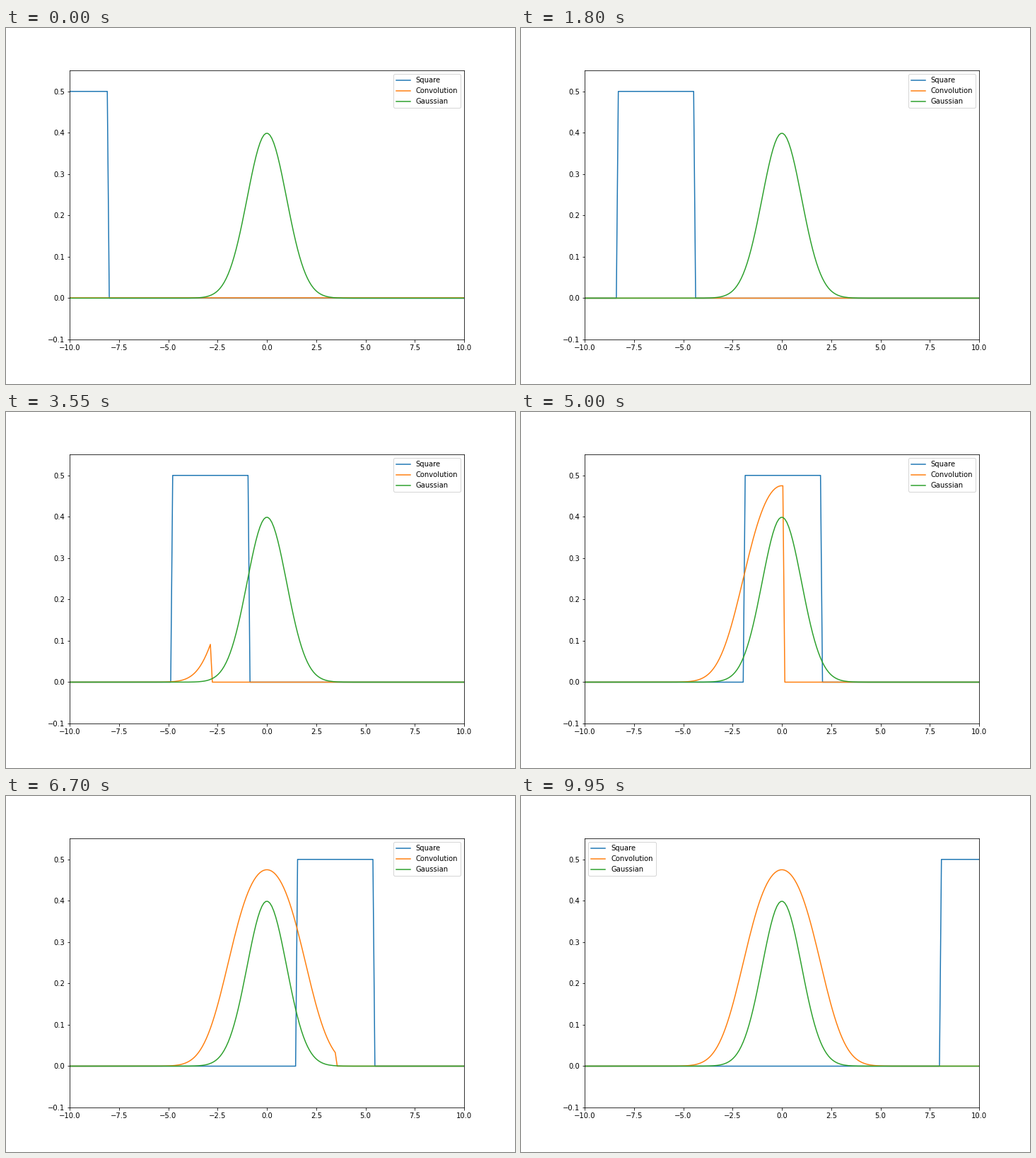
A matplotlib script for the animation above (10000 ms loop, 720 px wide and 504 px high).

```python
import numpy as np
import matplotlib.pyplot as plt
from matplotlib.animation import FuncAnimation

FRAMES = 200
HALF_WIDTH = 2
HEIGHT = 0.5

x = np.linspace(-10, 10, FRAMES)
dx = x[1] - x[0]
gauss = np.exp(-x**2 / 2) / np.sqrt(2 * np.pi)


def square(center):
    return np.where(np.abs(x - center) < HALF_WIDTH, HEIGHT, 0.0)


full_conv = np.array([np.sum(square(t) * gauss) * dx for t in x])

plt.rcParams["font.family"] = "DejaVu Sans"
fig, ax = plt.subplots(figsize=(10, 7), dpi=72)
fig.subplots_adjust(left=0.125, right=0.9, bottom=0.125, top=0.88)
ax.set_xlim(-10, 10)
ax.set_ylim(-0.1, 0.55)

square_line, = ax.plot(x, square(x[0]), color="C0", label="Square")
conv_line, = ax.plot(x, np.zeros_like(x), color="C1", label="Convolution")
ax.plot(x, gauss, color="C2", label="Gaussian")
# "best" moves the legend aside once the square reaches it
ax.legend(loc="best")


def update(n):
    square_line.set_ydata(square(x[n]))
    conv_line.set_ydata(np.where(np.arange(FRAMES) <= n, full_conv, 0.0))
    return square_line, conv_line


anim = FuncAnimation(fig, update, frames=FRAMES, interval=50,
                     repeat=True, repeat_delay=0, blit=False)
plt.show()
```
